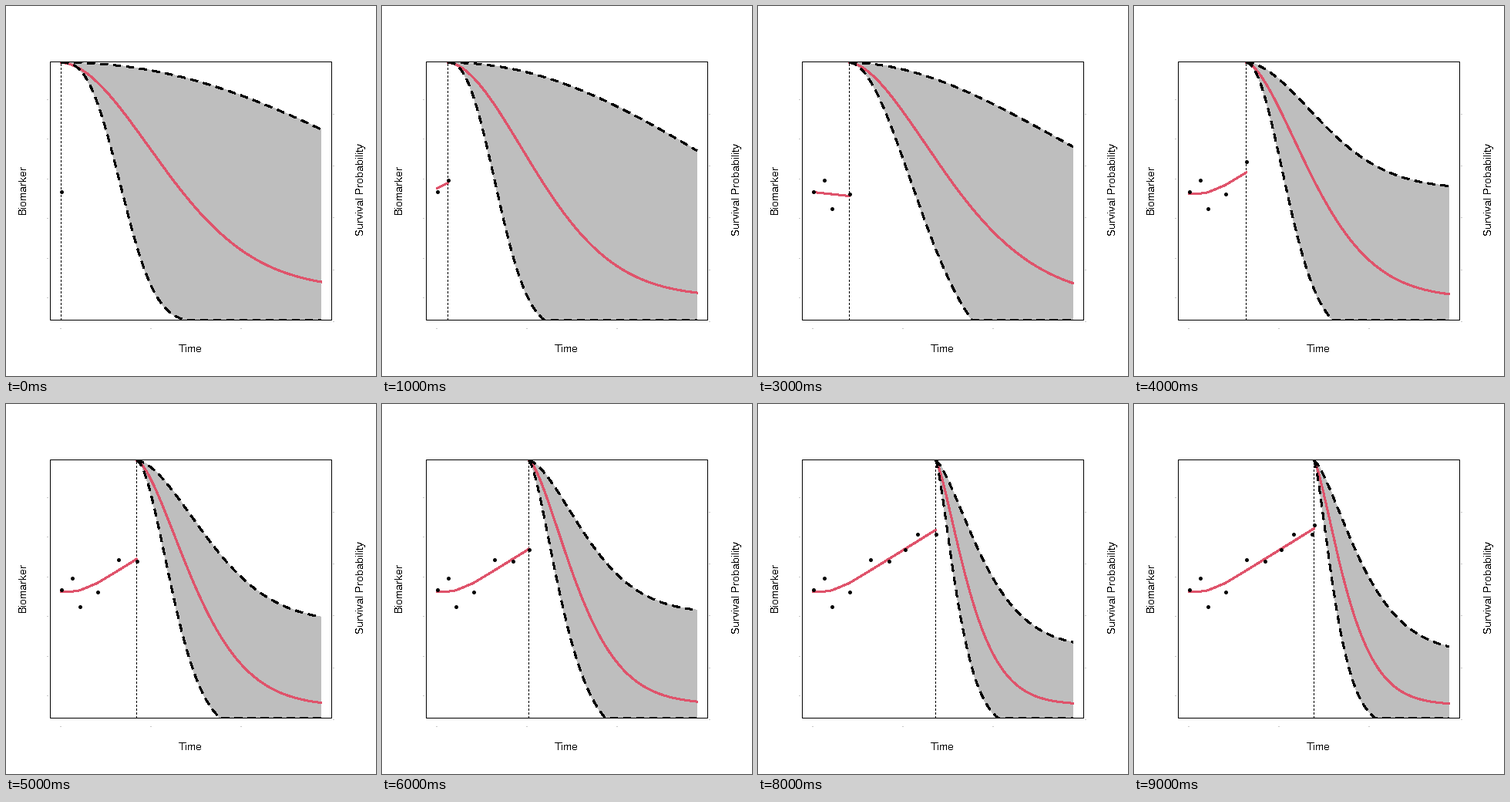
Animation of 480x480 px, one loop 10000 ms. Source, as a matplotlib script:

```python
import numpy as np
import matplotlib.pyplot as plt
from matplotlib.animation import FuncAnimation
from matplotlib.patches import Polygon, Rectangle

SIZE = 480
LEFT, TOP, RIGHT, BOTTOM = 57, 72, 422, 407
FULL_Y, ZERO_Y, END_X = 73, 406.5, 408
RED, GREY, TICK = "#DF536B", "#BEBEBE", "#C8C8C8"

plt.rcParams.update({
    "font.family": "Liberation Sans",
    "text.antialiased": False,
    "text.hinting": "native",
    "text.hinting_factor": 1,
})

# Biomarker measurements, one more per step
VISIT_X = np.array([71, 85, 95, 118, 145, 169, 190, 206, 230, 233])
VISIT_Y = np.array([240, 225, 262, 243, 201, 203, 188, 168, 168, 156])

# Ends of the straight trend while there are few measurements
EARLY = {1: (236, 229), 2: (241, 244), 3: (241, 246)}

# Forecast parameters at key visits; visits between them are interpolated
KEY_X = VISIT_X[[0, 1, 2, 4, 5, 7, 9]]
MID_SCALE = [172, 148, 210, 110, 94, 66, 52]
MID_FLOOR = [0.12, 0.09, 0.07, 0.085, 0.045, 0.06, 0.05]
UPPER_SCALE = [590, 490, 620, 125, 118, 76, 75]
UPPER_FLOOR = [0, 0, 0, 0.51, 0.37, 0.435, 0.25]
LOWER_SCALE = [91, 76, 158, 66, 59, 50.5, 34]
LOWER_SHAPE = [2.7, 2.4, 1.85, 2, 1.75, 1.3, 1.4]
LOWER_FLOOR = [-0.01, -0.04, -0.3, -0.06, -0.06, -0.12, -0.04]


def survival_y(t, scale, shape, floor):
    """Weibull survival falling towards a floor, as a height on the stage."""
    s = floor + (1 - floor) * np.exp(-(t / scale) ** shape)
    return ZERO_Y - (ZERO_Y - FULL_Y) * np.maximum(s, 0)


def forecast(cut):
    x = np.linspace(cut, END_X, 200)
    t, age = x - cut, cut - VISIT_X[0]

    def at(values):
        return np.interp(cut, KEY_X, values)

    mid = survival_y(t, at(MID_SCALE), 1.85 - 0.003 * age, at(MID_FLOOR))
    upper = survival_y(t, at(UPPER_SCALE), 2.15 - 0.0045 * age, at(UPPER_FLOOR))
    lower = survival_y(t, at(LOWER_SCALE), at(LOWER_SHAPE), at(LOWER_FLOOR))
    return x, mid, upper, lower


def trend(step):
    """Fitted biomarker: a line at first, then level with a smooth bend upwards."""
    x = VISIT_X[:step + 1]
    if step == 0:
        return [], []
    if step in EARLY:
        return x[[0, -1]], EARLY[step]
    return x, 243.5 - 0.62 * 8 * np.log1p(np.exp((x - 100) / 8))


# At 72 dpi one point is one pixel; integers fall on pixel centres
fig = plt.figure(figsize=(SIZE / 72, SIZE / 72), dpi=72, facecolor="white")
ax = fig.add_axes([0, 0, 1, 1])
ax.set_xlim(-0.5, SIZE - 0.5)
ax.set_ylim(SIZE - 0.5, -0.5)
ax.axis("off")

region = Rectangle((LEFT - 0.5, TOP - 0.5), RIGHT - LEFT + 1, BOTTOM - TOP + 1,
                   transform=ax.transData)


def line(color="black", width=2, z=3, **kw):
    artist, = ax.plot([], [], color=color, lw=width, zorder=z, snap=False,
                      antialiased=False, **kw)
    artist.set_clip_path(region)
    return artist


def label(x, y, text, angle=0):
    ax.text(x, y, text, fontsize=14, ha="center", va="baseline",
            rotation=angle, rotation_mode="anchor")


def tick(x, y):
    ax.add_patch(Rectangle((x - 0.5, y - 0.5), 2, 1, fc=TICK, ec="none", snap=False))


band = Polygon([(0, 0), (0, 1), (1, 1)], closed=True, fc=GREY, ec="none",
               antialiased=False, snap=False, zorder=2)
ax.add_patch(band)
band.set_clip_path(region)

survival = line(RED)
bounds = [line(z=4, dashes=(4.5, 3.5), dash_capstyle="butt") for _ in range(2)]
now = line(width=1, z=4, dashes=(2, 2), dash_capstyle="butt")
fit = line(RED, z=5)
visits = line(width=0, z=6, marker="o", ms=5, mew=0)

ax.add_patch(Rectangle((LEFT, TOP), RIGHT - LEFT, BOTTOM - TOP, fill=False,
                       ec="black", lw=1, snap=False, zorder=7))

for i in range(6):
    tick(53, round(121 + 51.4 * i))
for i in range(3):
    tick(70 + 117 * i, 418)
for i in range(5):
    tick(424, round(140 + 67.25 * i))

label(238.5, 448.5, "Time")
label(25.5, 238, "Biomarker", 90)
label(463.5, 238, "Survival Probability", 90)


def draw(step):
    cut = VISIT_X[step]
    x, mid, upper, lower = forecast(cut)
    band.set_xy(np.column_stack([np.r_[x, x[::-1]], np.r_[upper, lower[::-1]]]))
    survival.set_data(x, mid)
    for artist, y in zip(bounds, (upper, lower)):
        artist.set_data(x, y)
    now.set_data([cut, cut], [BOTTOM, TOP])
    fit.set_data(*trend(step))
    visits.set_data(VISIT_X[:step + 1], VISIT_Y[:step + 1])
    return band, survival, *bounds, now, fit, visits


anim = FuncAnimation(fig, draw, frames=len(VISIT_X), interval=1000, repeat=True,
                     repeat_delay=0, blit=False)
plt.show()
```
